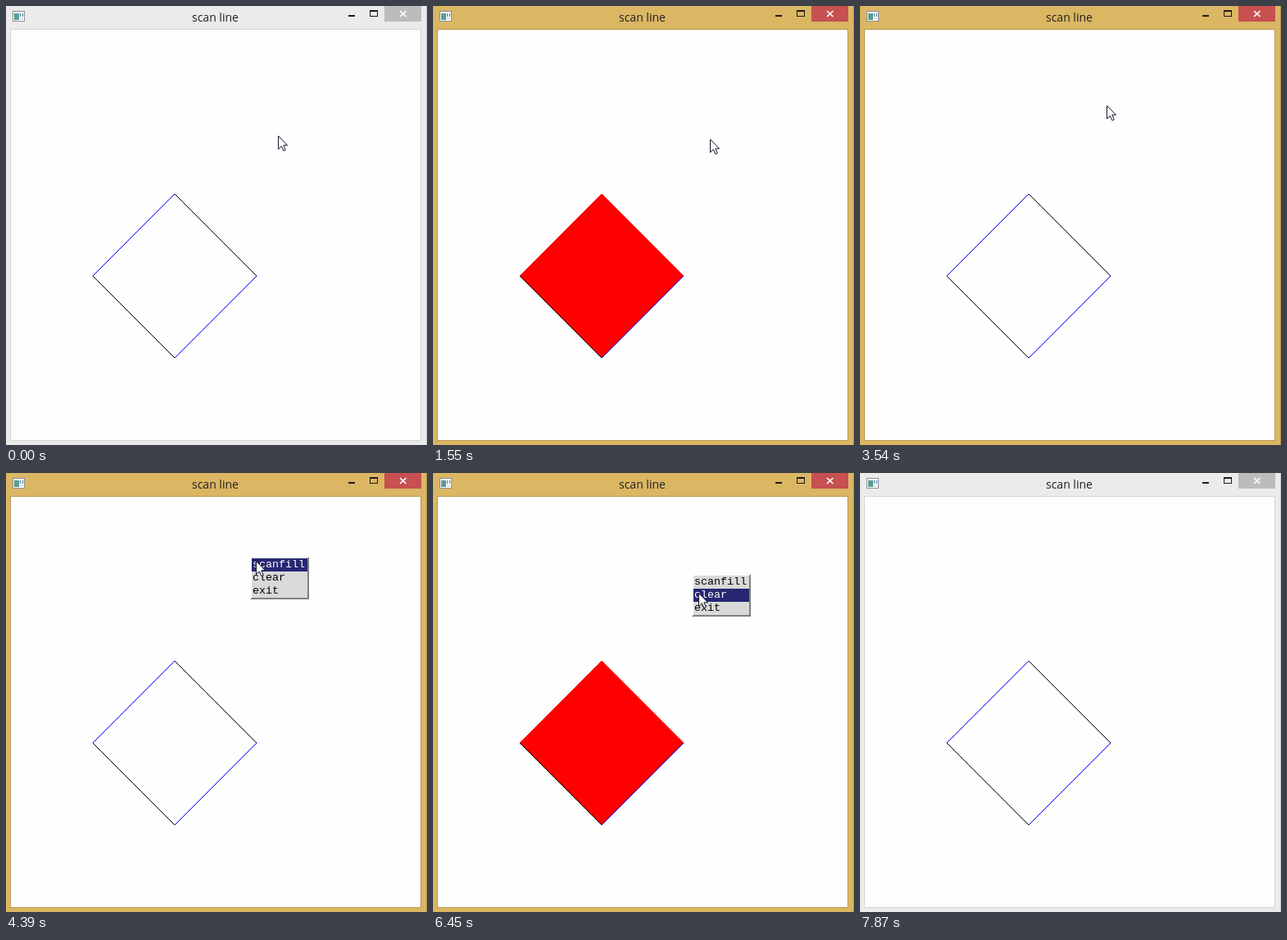
Recreate the animation shown at these times as an HTML page. Size 514 by 535 pixels, loop 7970 ms.

```html
<!DOCTYPE html>
<html lang="en">
<head>
<meta charset="utf-8">
<title>scan line</title>
<style>
  html, body { margin: 0; width: 100%; height: 100%; overflow: hidden; }
  .window {
    position: relative; width: 514px; height: 535px; overflow: hidden;
    background: var(--frame); box-shadow: inset -1px 0 var(--edge);
  }
  .window, .fill, .cursor, .menu, .scan, .clear { animation: 7970ms step-end infinite; }
  .window { animation-name: focus; }
  .fill { animation-name: fill; }
  .cursor { animation-name: move; }
  .menu { animation-name: popup; }
  .scan { animation-name: pick-scan; }
  .clear { animation-name: pick-clear; }

  .title {
    position: absolute; left: 227px; top: 4px; white-space: nowrap;
    font: 14px/20px "Open Sans", "Noto Sans", sans-serif; color: #222;
  }
  .client {
    position: absolute; left: 5px; top: 28px; width: 500px; height: 500px;
    border: 1px solid var(--edge); background: #fefefe;
  }
  .art { position: absolute; left: 0; top: 0; }
  .close { fill: var(--close); }

  .menu {
    position: absolute; left: 0; top: 0; width: 68px; height: 48px;
    border: 2px solid; border-color: #fff #808080 #808080 #fff;
    background: #d9d9d9; color: #000;
    font: 13.333px/16px "Liberation Mono", "DejaVu Sans Mono", monospace;
  }
  .menu div { height: 16px; padding-left: 1px; white-space: pre; }
  .cursor { position: absolute; left: 0; top: 0; overflow: visible; }

  @keyframes focus {
    0%, 98.745% { --frame: #ebebeb; --edge: #d5d5d5; --close: #bcbcbc; }
    8.531% { --frame: #dbb663; --edge: #b99a54; --close: #c75050; }
  }
  @keyframes fill {
    0%, 44.416%, 85.947% { visibility: hidden; }
    19.447%, 63.738% { visibility: visible; }
  }
  @keyframes popup {
    0%, 19.447%, 44.416%, 63.738%, 85.947% { visibility: hidden; transform: none; }
    8.531% { visibility: visible; transform: translate(332px, 158px); }
    29.861% { visibility: visible; transform: translate(292px, 102px); }
    51.568% { visibility: visible; transform: translate(298px, 102px); }
    68.883% { visibility: visible; transform: translate(316px, 123px); }
  }
  @keyframes pick-scan {
    0%, 19.447%, 40.903%, 63.738%, 79.171% { background: #d9d9d9; color: #000; }
    14.052%, 33.751%, 55.081%, 74.027% { background: #262673; color: #fff; }
  }
  @keyframes pick-clear {
    0%, 44.416%, 85.947% { background: #d9d9d9; color: #000; }
    40.903%, 79.171% { background: #262673; color: #fff; }
  }
  @keyframes move {
    0% { transform: translate(332px, 158px); }
    14.052% { transform: translate(338px, 162px); }
    26.097% { transform: translate(318px, 136px); }
    27.979% { transform: translate(297px, 108px); }
    29.861% { transform: translate(292px, 102px); }
    33.751% { transform: translate(293px, 105px); }
    35.508% { transform: translate(295px, 109px); }
    37.264% { transform: translate(297px, 113px); }
    39.146% { transform: translate(299px, 117px); }
    40.903% { transform: translate(301px, 121px); }
    46.047% { transform: translate(301px, 116px); }
    47.929% { transform: translate(300px, 109px); }
    49.686% { transform: translate(298px, 104px); }
    51.568% { transform: translate(298px, 102px); }
    55.081% { transform: translate(305px, 107px); }
    56.587% { transform: translate(312px, 111px); }
    65.495% { transform: translate(314px, 115px); }
    67.252% { transform: translate(316px, 121px); }
    68.883% { transform: translate(316px, 123px); }
    74.027% { transform: translate(320px, 135px); }
    77.415% { transform: translate(321px, 139px); }
    79.171% { transform: translate(323px, 143px); }
    80.928% { transform: translate(324px, 146px); }
    87.829% { transform: translate(334px, 196px); }
    89.711% { transform: translate(368px, 345px); }
    91.593% { transform: translate(409px, 507px); visibility: visible; }
    93.35%, 100% { transform: translate(409px, 507px); visibility: hidden; }
  }
</style>
</head>
<body>
<div class="window">
  <div class="title">scan line</div>
  <div class="client"></div>

  <svg class="art" width="514" height="535" shape-rendering="crispEdges">
    <!-- window icon -->
    <rect x="8.5" y="6.5" width="14" height="12" fill="#fafafa" stroke="#8a8f94"/>
    <rect x="10" y="9" width="6" height="8" fill="#5a9c92"/>
    <path d="M17 9h1v4h-1zM20 9h1v4h-1z" fill="#4a7fb0"/>
    <path d="M17 15h4v1h-4z" fill="#c8ccd0"/>
    <!-- window buttons -->
    <rect x="418" y="11" width="8" height="2" fill="#1c1c1c"/>
    <path d="M444 5h10v8h-10zM445 7v5h8v-5z" fill="#1c1c1c" fill-rule="evenodd"/>
    <rect class="close" x="462" width="45" height="19"/>
    <path d="M481 6l7.5 7M488.500 6l-7.500 7" stroke="#fff" stroke-width="1.7" shape-rendering="auto"/>
    <!-- polygon -->
    <g fill="none">
      <path d="M106 329L206 229" stroke="#00f"/>
      <path d="M206 229L306 329" stroke="#000"/>
      <path class="fill" d="M105.500 329L206 228.500L306.500 329L206 429Z" fill="#f00"/>
      <path d="M306 329L206 429" stroke="#00f"/>
      <path d="M206 429L106 329" stroke="#000"/>
    </g>
  </svg>

  <div class="menu">
    <div class="scan">scanfill</div>
    <div class="clear">clear</div>
    <div>exit</div>
  </div>

  <svg class="cursor" width="12" height="19">
    <path d="M.5 .5V16.500L4.300 12.900L6.900 18.500L9.300 17.500L6.800 11.800H11.500Z"
      fill="#fff" stroke="#15152a"/>
  </svg>
</div>
</body>
</html>
```
